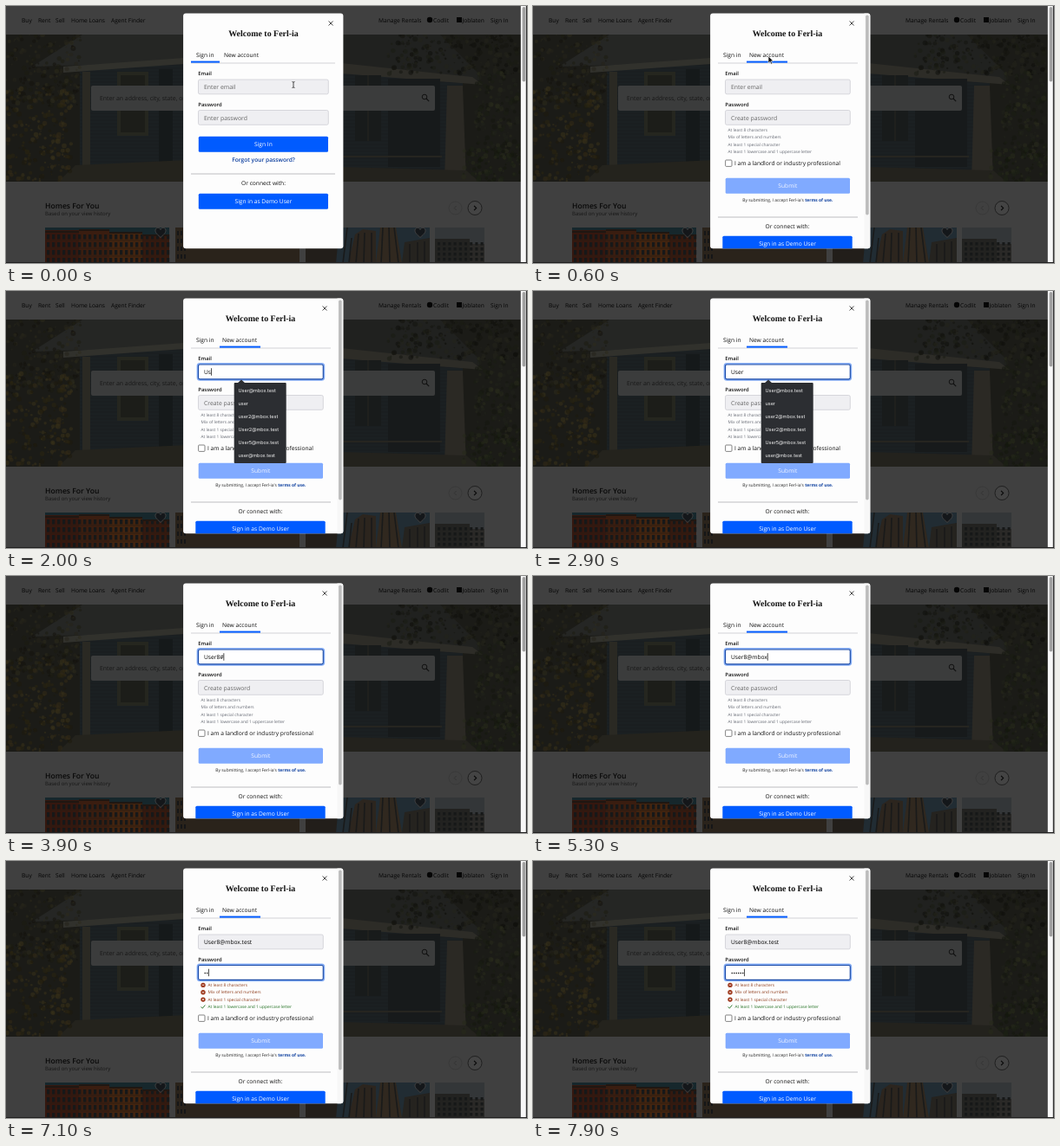
An HTML page for the animation above (8 s loop, 600 by 297 pixels).

```html
<!DOCTYPE html>
<html lang="en">
<head>
<meta charset="utf-8">
<style>
html, body { margin: 0; width: 100%; height: 100%; overflow: hidden; background: #404040; }
svg { display: block; width: 600px; height: 297px; font-family: "Open Sans", "Noto Sans", sans-serif; text-rendering: geometricPrecision; }
text { white-space: pre; }
</style>
</head>
<body>
<svg id="stage" viewBox="0 0 600 297"></svg>
<script>
const BASE = 6.65, BLUE = '#005bff', NAVY = '#0b3e9e', INK = '#111', HINT = '#666', RULE = '#666a74';
const stage = document.getElementById('stage');
const $ = id => document.getElementById(id);

const text = (x, y, s, fill = INK, size = BASE, extra = '') =>
  `<text x="${x}" y="${y}" fill="${fill}" font-size="${size}" ${extra}>${s}</text>`;
const mid = (x, y, s, fill, size, extra = '') => text(x, y, s, fill, size, 'text-anchor="middle" ' + extra);
const rect = (x, y, w, h, fill, extra = '') =>
  `<rect x="${x}" y="${y}" width="${w}" height="${h}" fill="${fill}" ${extra}/>`;
const poly = (points, fill) => `<polygon points="${points}" fill="${fill}"/>`;
const line = (d, color, width = 1, extra = '') =>
  `<path d="${d}" fill="none" stroke="${color}" stroke-width="${width}" ${extra}/>`;
const bold = 'font-weight="600"';

let seed = 7;
const rnd = () => (seed = seed * 16807 % 2147483647) / 2147483647;

function leaves(n, x, y, w, h, colors) {
  let out = '';
  for (let i = 0; i < n; i++) {
    out += `<circle cx="${x + rnd() * w}" cy="${y + rnd() * h}" r="${.7 + rnd() * 2.3}"
      fill="${colors[i % colors.length]}" opacity=".55"/>`;
  }
  return out;
}

function grid(x, y, cols, rows, dx, dy, w, h, fill) {
  let out = '';
  for (let i = 0; i < cols * rows; i++)
    out += rect(x + i % cols * dx, y + Math.floor(i / cols) * dy, w, h, fill);
  return out;
}

function siding(x, y, w, h) {
  let d = '';
  for (let v = y; v < y + h; v += 4) d += `M${x} ${v}h${w}`;
  return rect(x, y, w, h, '#1b2022') + line(d, '#171b1d', .7);
}

function house() {
  return `<g clip-path="url(#photo)">` +
    rect(0, 33, 594, 170, '#1b1b17') +
    siding(85, 60, 125, 130) +
    poly('30,70 88,33 205,33 205,62 95,68', '#252624') +
    poly('66,70 205,60 205,67 66,77', '#31312c') +
    rect(128, 76, 36, 74, '#25261f') + rect(132, 80, 28, 66, '#1c1d19') +
    rect(88, 76, 9, 112, '#2a2923') + rect(176, 73, 16, 113, '#15191a') +
    poly('80,184 210,178 210,203 60,203', '#24231d') +
    leaves(230, 0, 33, 86, 85, ['#26241a', '#14130e', '#1d1c12', '#2d2a1c']) +
    leaves(230, 0, 95, 76, 108, ['#332b17', '#1e1a0e', '#2a2512', '#3a321b']) +
    siding(386, 60, 140, 130) +
    poly('386,33 500,33 545,79 545,86 386,70', '#20211f') +
    poly('386,66 537,82 549,91 386,78', '#2d2c27') +
    rect(402, 80, 30, 76, '#181b1b') + line('M417 80v76M402 116h30', '#24241f', 1.2) +
    rect(440, 84, 60, 102, '#171a1b') +
    leaves(260, 440, 33, 153, 46, ['#14140f', '#1b1c13', '#23241b', '#0f100c']) +
    leaves(200, 540, 76, 54, 104, ['#20221a', '#15170f', '#292a1c', '#1b1e13']) +
    poly('508,92 526,92 530,203 505,203', '#2b2924') +
    poly('386,186 530,190 545,203 386,203', '#23221d') +
    line('M386 174H502', '#262520', 2) +
    leaves(90, 526, 165, 68, 38, ['#1d2214', '#272a1b', '#14180e']) + `</g>`;
}

const heart = (x, y) => `<path d="M${x} ${y + 5}c-3-3-6-5-6-8 0-4 5-4 6-1 1-3 6-3 6 1 0 3-3 5-6 8z"
  fill="#14171a" stroke="#444"/>`;

function cards() {
  return rect(45, 256, 143, 41, '#16272c') +
    rect(45, 259, 39, 38, '#35170f') + rect(84, 258, 35, 39, '#3a1d10') +
    rect(119, 261, 38, 36, '#43240f') + rect(157, 264, 31, 33, '#35190f') +
    grid(47, 264, 24, 4, 6, 9, 3.2, 5.5, '#171818') +
    line('M45 261h39M84 259h35M119 262h38M157 265h31', '#1f1712', 2) +
    line('M45 271h143M45 280h143M45 289h143', '#2b1c14', .8) +
    rect(195, 256, 143, 41, '#2a231b') + grid(197, 260, 3, 4, 4, 9, 2, 5, '#151617') +
    rect(345, 256, 143, 41, '#212c33') +
    poly('345,256 384,256 380,297 345,297', '#221e1a') +
    poly('394,297 402,264 411,258 426,260 426,297', '#2c251e') +
    poly('426,297 431,256 449,256 456,297', '#30281f') +
    poly('456,297 459,273 488,268 488,297', '#25231f') +
    line('M393 256l-5 41M398 268l-3 29M406 263l-3 34M413 262l-1 35M421 262v35M434 256l-2 41M441 256l1 41M447 256l5 41M465 275v22M474 273v24M482 272v25', '#191a1a', 1.6) +
    rect(494, 256, 57, 41, '#333638') + rect(494, 269, 40, 28, '#222220') +
    rect(534, 275, 17, 22, '#2a2927') + grid(497, 273, 9, 4, 6.2, 6, 3, 3.5, '#161818') +
    heart(178, 262.5) + heart(477, 262.5);
}

function page() {
  const nav = [[18, 'Buy'], [37, 'Rent'], [57, 'Sell'], [75, 'Home Loans'], [121, 'Agent Finder'],
    [429, 'Manage Rentals'], [492, 'Codlit'], [525.5, 'Joblaten'], [558, 'Sign In']];
  return rect(0, 0, 600, 297, '#404040') + house() +
    nav.map(([x, s]) => text(x, 18.5, s, '#050505')).join('') +
    '<circle cx="488" cy="16" r="3.2" fill="#050505"/>' + rect(519, 13, 6, 6, '#050505') +
    rect(98, 92, 396, 29, '#3b3c3c', 'rx="2"') +
    text(108, 109, 'Enter an address, city, state, or ZIP code', '#181818', 6.9) +
    '<circle cx="482" cy="105" r="2.8" fill="none" stroke="#111"/>' +
    line('M484 107l3.2 3.2', '#111', 1.1) +
    text(45, 234, 'Homes For You', '#080808', 8.6, bold) +
    text(45, 242.3, 'Based on your view history', '#161616', 6) +
    '<circle cx="517.5" cy="233.5" r="7.5" fill="none" stroke="#383838" stroke-width=".8"/>' +
    '<circle cx="540" cy="233.5" r="8" fill="#444" stroke="#171717" stroke-width=".8"/>' +
    line('M518.7 231l-2.5 2.5 2.5 2.5', '#343434') + line('M539 230.8l2.7 2.7-2.7 2.7', '#080808', 1.1) +
    cards() + rect(592.8, 0, 7.2, 297, '#f8f8f8') + rect(594.6, 1, 3.6, 86.5, '#a0a0a0', 'rx="1.8"') +
    rect(598.8, 0, 1.2, 297, '#303030') + rect(0, 296, 600, 1, '#202020');
}

// Parts that both forms share; cx is the middle of the content, closeX that of the close mark.
const frame = (cx, right, closeX) =>
  mid(cx, 34.8, 'Welcome to Ferl-ia', INK, 9.95, 'font-family="Liberation Serif, serif" font-weight="700"') +
  line(`M${closeX - 2.5} 17.5l5 5m0-5l-5 5`, '#222', .8) + line(`M213 66H${right}`, '#c8c8cc', .8) +
  text(221.3, 80, 'Email', INK, 5.9, bold) + text(221.3, 115.5, 'Password', INK, 5.9, bold);
const button = (x, y, w, fill, label, color = '#fff') =>
  rect(x, y, w, 18, fill, 'rx="1.5"') + mid(x + w / 2, y + 11.7, label, color);
const field = (y, w, id) => rect(221.5, y, w, 16.8, '#efeff2', `id="${id}" rx="1.8" stroke="#c9c9d0" stroke-width=".7"`);

function signIn() {
  return frame(296.5, 379, 374) + text(219, 59, 'Sign in') + text(251, 59, 'New account') +
    rect(213, 63.6, 33, 2, BLUE) +
    field(85, 149.8, 'oldEmail') + field(120.5, 149.8, 'oldPass') +
    text(228, 96, 'Enter email', HINT, 6.9) + text(228, 131.5, 'Enter password', HINT, 6.9) +
    button(221.8, 150.7, 149.2, BLUE, 'Sign In') +
    mid(296.5, 179.5, 'Forgot your password?', NAVY, BASE, bold) +
    line('M213 194H379', '#bdbdc0') + mid(296.5, 207, 'Or connect with:') +
    button(221.8, 216.7, 149.2, BLUE, 'Sign in as Demo User');
}

const rules = ['At least 8 characters', 'Mix of letters and numbers', 'At least 1 special character',
  'At least 1 lowercase and 1 uppercase letter'];

function signUp() {
  const hints = rules.map((s, i) => {
    const y = 143.4 + i * 8.35;
    return `<g id="cross${i}"><circle cx="227" cy="${y}" r="2.7" fill="#9c3418"/>` +
      line(`M226 ${y - 1}l2 2m0-2l-2 2`, '#fff', .7) + '</g>' +
      line(`M224.7 ${y}l1.6 1.8 3-3.8`, '#267326', .9, `id="tick${i}"`) +
      text(224.5, y + 1.7, s, RULE, 4.85, `id="rule${i}"`);
  }).join('');
  return frame(293, 374, 367) + text(219, 59, 'Sign in') + text(249, 59, 'New account') +
    rect(246, 63.6, 47, 2, BLUE) +
    rect(220.4, 0, 146, 19, 'none', 'id="ring" rx="2.8" stroke="#86aef5" stroke-width="1.6"') +
    field(85, 143.8, 'email') + field(120.5, 143.8, 'pass') +
    text(228, 96, '', '#000', BASE, 'id="emailText"') + text(228, 131.5, '', '#000', BASE, 'id="passText"') +
    rect(228, 0, .7, 8.5, '#000', 'id="caret"') + hints +
    rect(221.6, 178, 7.4, 7.4, '#fff', 'rx="1" stroke="#666" stroke-width=".8"') +
    text(232, 184.3, 'I am a landlord or industry professional') +
    button(221.7, 198.7, 143.3, '#80aaff', 'Submit', '#eef4ff') +
    mid(293.3, 226, `By submitting, I accept Ferl-ia's <tspan fill="${NAVY}" font-weight="700">terms of use.</tspan>`, '#222', 4.95) +
    line('M213 244H374', '#bdbdc0') + mid(293, 257, 'Or connect with:') +
    button(218.3, 265.7, 149.4, BLUE, 'Sign in as Demo User') +
    rect(381.5, 8, 7, 273, '#f7f7f7') + rect(383.1, 10.5, 3.6, 231, '#bcbcbc', 'rx="1.8"');
}

const menu = (id, w, rows) => `<g id="${id}">` + poly('266.5,106.5 271,102.5 275.5,106.5', '#2c2e32') +
  rect(262.7, 106, w, 93, '#2c2e32', 'rx="1"') +
  rows.map((s, i) => text(267.5, 117 + i * 15, s, '#f2f2f2', 5.5, 'font-family="Inter, sans-serif"')).join('') + '</g>';

stage.innerHTML = `<defs><clipPath id="photo">${rect(0, 33, 593.5, 170, '#000')}</clipPath>
  <clipPath id="card">${rect(204.1, 8.5, 184.3, 271.8, '#000', 'rx="3"')}</clipPath></defs>` + page() +
  `<g clip-path="url(#card)">${rect(204, 8, 185, 273, '#fdfdfd')}
  <g id="signIn">${signIn()}</g><g id="signUp">${signUp()}</g></g>` +
  menu('menuAll', 74.5, ['marlonquibb@post.test', 'User@mbox.test', 'user', 'user2@mbox.test', 'main@mbox.test', 'quibbs']) +
  menu('menuUser', 60, ['User@mbox.test', 'user', 'user2@mbox.test', 'User2@mbox.test', 'User5@mbox.test', 'user@mbox.test']) +
  `<g id="beam">${line('M-1.5-3.5q1.5 0 1.5 1 0-1 1.5-1M0-2.5v5M-1.5 3.5q1.5 0 1.5-1 0 1 1.5 1', '#222', .8)}</g>
  <path id="arrow" d="M0 0v8l2-1.8 1.3 3 1.3-.6-1.3-2.9h2.6z" fill="#111" stroke="#fff" stroke-width=".6"/>`;

const emailKeys = [[1000, ''], [1700, 'U'], [1900, 'Us'], [2200, 'Use'], [2400, 'User'], [3000, 'User8'],
  [3700, 'User8#'], [4200, 'User8'], [4500, 'User8@'], [4700, 'User8@m'], [4900, 'User8@mb'],
  [5100, 'User8@mbo'], [5200, 'User8@mbox'], [5400, 'User8@mbox.'], [5500, 'User8@mbox.t'],
  [5600, 'User8@mbox.te'], [5700, 'User8@mbox.tes'], [5800, 'User8@mbox.test']];
const passKeys = [5900, 6700, 7000, 7200, 7400, 7600, 7800].map((at, i) => [at, '•'.repeat(i)]);
const path = [[0, 331, 91], [100, 331, 91], [500, 271, 58], [700, 271, 58], [1000, 277, 89], [8000, 277, 89]];

const show = (id, on) => $(id).setAttribute('visibility', on ? 'inherit' : 'hidden');
const set = (id, attrs) => { for (const k in attrs) $(id).setAttribute(k, attrs[k]); };
const latest = (keys, t) => keys.filter(k => k[0] <= t).pop() || [0, ''];

function pointer(t) {
  const i = path.findIndex(p => p[0] > t), [t0, x0, y0] = path[i - 1], [t1, x1, y1] = path[i];
  const u = (t - t0) / (t1 - t0), k = u * u * (3 - 2 * u);
  return [x0 + (x1 - x0) * k, y0 + (y1 - y0) * k];
}

function fill(id, value, hint) {
  $(id).textContent = value || hint;
  set(id, { fill: value ? '#000' : HINT, 'font-size': value ? BASE : 6.8 });
}

function draw(t) {
  const created = t >= 600, focus = t < 1000 ? '' : t < 5900 ? 'email' : 'pass';
  const [emailAt, email] = latest(emailKeys, t), [passAt, pass] = latest(passKeys, t);
  show('signIn', !created);
  show('signUp', created);
  fill('emailText', email, 'Enter email');
  fill('passText', pass, 'Create password');
  for (const id of ['email', 'pass']) {
    const on = id === focus;
    set(id, { fill: on ? '#fff' : '#efeff2', stroke: on ? '#1a4aa8' : '#c9c9d0', 'stroke-width': on ? 1.2 : .7 });
  }

  const inPass = focus === 'pass', value = inPass ? pass : email;
  const since = t - (inPass ? passAt : emailAt);
  show('ring', focus);
  set('ring', { y: inPass ? 119.4 : 83.9 });
  show('caret', focus && since % 1000 < 500);
  set('caret', { y: inPass ? 124.7 : 89.2,
    x: 228 + (value ? $(inPass ? 'passText' : 'emailText').getComputedTextLength() : 0) });

  rules.forEach((_, i) => {
    const met = i === 3 && pass.length > 1;
    show('cross' + i, pass && !met);
    show('tick' + i, met);
    set('rule' + i, { x: pass ? 232.5 : 224.5, fill: !pass ? RULE : met ? '#267326' : '#8f3d1c' });
  });

  show('menuAll', t >= 1000 && t < 1700);
  show('menuUser', t >= 1700 && t < 3000);
  const [x, y] = pointer(t), overField = y > 85;
  show('beam', t < 1700 && overField);
  show('arrow', t < 1700 && !overField);
  for (const id of ['beam', 'arrow']) set(id, { transform: `translate(${x} ${y})` });
}

const start = performance.now();
function tick() {
  draw(Math.floor((performance.now() - start) % 8000 / 100) * 100);
  requestAnimationFrame(tick);
}
tick();
</script>
</body>
</html>
```
